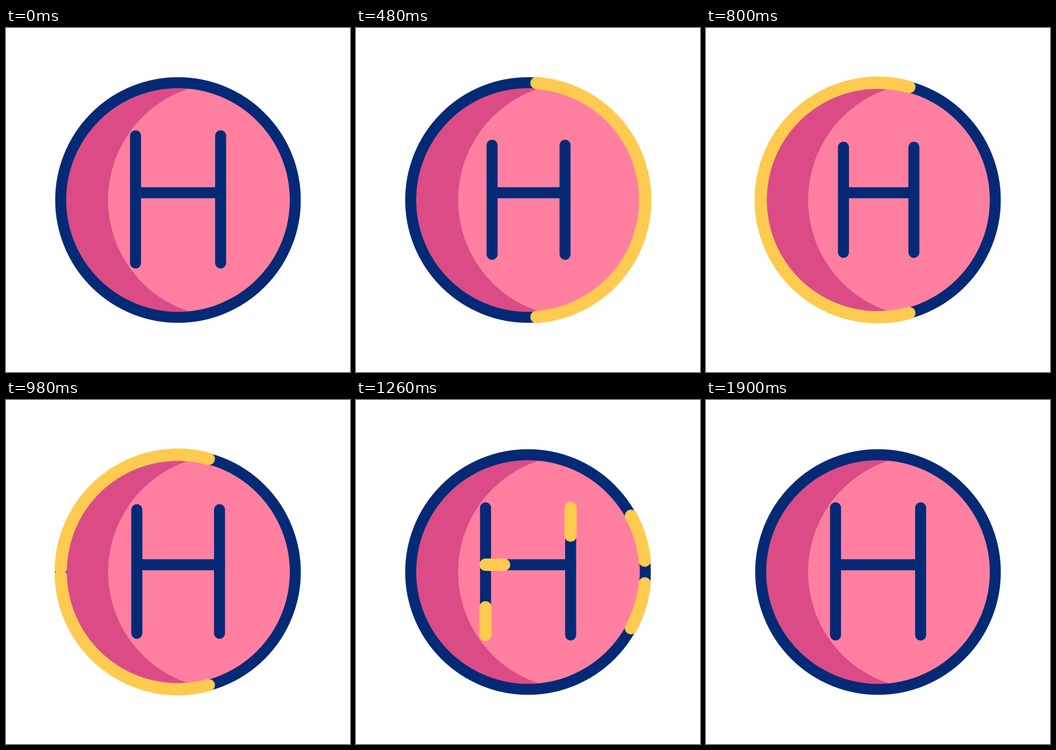
Animation, 640 px wide and 640 px high, one loop 2720 ms. Source, as an HTML page with a canvas:

```html
<!DOCTYPE html>
<html lang="en">
<head>
<meta charset="utf-8">
<title>Letter H</title>
<style>
html, body { margin: 0; width: 100%; height: 100%; overflow: hidden; background: #fff; }
canvas { display: block; width: 100%; height: 100%; }
</style>
</head>
<body>
<canvas id="stage" width="640" height="640"></canvas>
<script>
const ctx = document.getElementById('stage').getContext('2d');
const LOOP = 2720, STEP = 20;
const NAVY = '#042a76', YELLOW = '#fecb50', PINK = '#ff7fa1', SHADE = '#db4c86';
const C = 320, R = 218.25, THIN = 20.5, WIDE = 22.8;

// Eased progress from 0 to 1 between times a and b
function ease(t, a, b) {
  const u = Math.min(1, Math.max(0, (t - a) / (b - a)));
  return u * u * (3 - 2 * u);
}

const mix = (a, b, k) => a + (b - a) * k;

function disc(x, y, r, color) {
  ctx.beginPath();
  ctx.arc(x, y, r, 0, Math.PI * 2);
  ctx.fillStyle = color;
  ctx.fill();
}

function stroke(color, width) {
  ctx.strokeStyle = color;
  ctx.lineWidth = width;
  ctx.stroke();
}

// Part of a line, from fraction s to fraction e
function bar([x1, y1, x2, y2], color, width, s = 0, e = 1) {
  ctx.beginPath();
  ctx.moveTo(mix(x1, x2, s), mix(y1, y2, s));
  ctx.lineTo(mix(x1, x2, e), mix(y1, y2, e));
  stroke(color, width);
}

function badge() {
  disc(C, C, R, SHADE);
  ctx.save();
  ctx.beginPath();
  ctx.arc(C, C, R, 0, Math.PI * 2);
  ctx.clip();
  disc(408, C, 218, PINK);
  ctx.restore();
  ctx.beginPath();
  ctx.arc(C, C, R, 0, Math.PI * 2);
  stroke(NAVY, THIN);
}

// Mirrored highlights run from the right side to the left and back
function ringGlow(t) {
  const s = 0.45 * (ease(t, 610, 840) - ease(t, 909, 1327));
  const e = ease(t, 165, 815) - ease(t, 955, 1363);
  if (e - s < 0.0005) return;
  for (const side of [-1, 1]) {
    ctx.beginPath();
    ctx.arc(C, C, R, side * s * Math.PI, side * e * Math.PI, side < 0);
    stroke(YELLOW, WIDE);
  }
}

function letter(t) {
  const k = 1 - 0.2 * (ease(t, 80, 700) - ease(t, 720, 1060));
  const px = x => mix(326.6, x, k), py = y => mix(323.2, y, k);
  const left = px(241), right = px(399.3), top = py(200.6), foot = py(437.2);
  const bars = [
    [left, foot, left, top],
    [left, 306.5, right, 306.5],
    [right, top, right, foot]
  ];
  for (const b of bars) bar(b, NAVY, THIN);

  const s = ease(t, 1434, 1898), e = ease(t, 1147, 1522);
  if (e - s < 0.0005) return;
  for (const b of bars) bar(b, YELLOW, WIDE, s, e);
}

function draw(t) {
  ctx.fillStyle = '#fff';
  ctx.fillRect(0, 0, 640, 640);
  ctx.lineCap = 'round';
  badge();
  ringGlow(t);
  letter(t);
}

const start = performance.now();
function tick() {
  const t = (performance.now() - start) % LOOP;
  draw(Math.floor(t / STEP) * STEP);
  requestAnimationFrame(tick);
}
tick();
</script>
</body>
</html>
```
